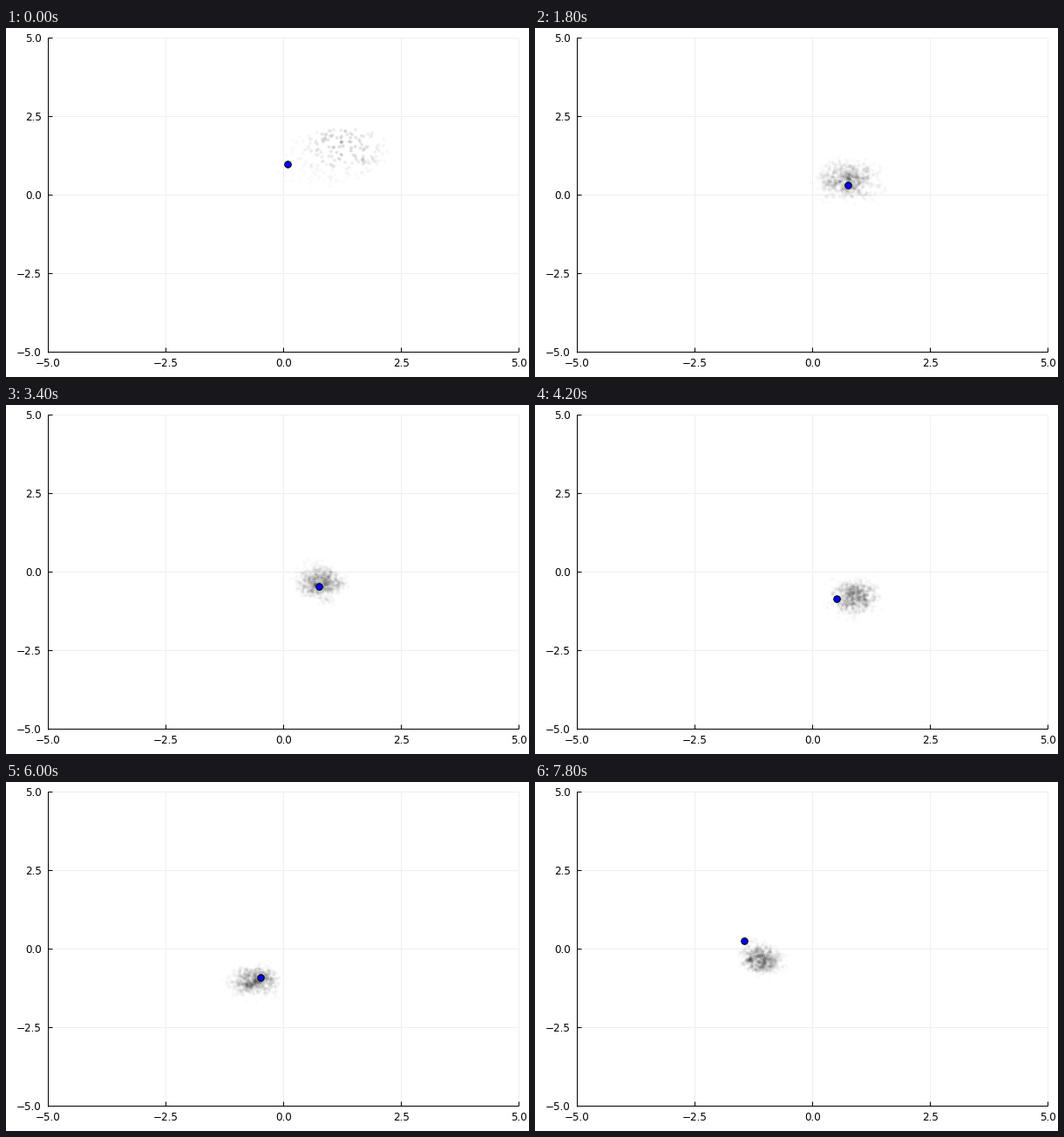
Animation of 600x400 px, one loop 8 s. Source, as a matplotlib script:

```python
import numpy as np
import matplotlib.pyplot as plt
from matplotlib.animation import FuncAnimation

W, H, DPI = 600, 400, 100
FRAMES, STEP = 40, 200
PT = 72 / DPI  # points per pixel
LEFT, RIGHT, TOP, BOTTOM = 48, 588, 11, 371
N, LOBES, PARENTS = 750, 6, 260

plt.rcParams["font.family"] = "DejaVu Sans"
fig = plt.figure(figsize=(W / DPI, H / DPI), dpi=DPI, facecolor="white")
ax = fig.add_axes([0, 0, 1, 1])
ax.set(xlim=(0, W), ylim=(H, 0))
ax.axis("off")


def line(x, y, color="black", z=1):
    ax.plot(x, y, color=color, lw=PT, zorder=z, solid_capstyle="butt")


def label(x, y, value, ha):
    text = f"{value:.1f}".replace("-", "\u2212")
    ax.text(x, y, text, ha=ha, va="center_baseline", fontsize=12 * PT)


for value in np.linspace(-5, 5, 5):
    x = LEFT + (value + 5) * 54
    y = BOTTOM - (value + 5) * 36
    if value > -5:
        line([x, x], [TOP, BOTTOM], "#efefef")
        line([LEFT, RIGHT], [y, y], "#efefef")
    line([x, x], [BOTTOM, BOTTOM - 5], z=2)
    line([LEFT, LEFT + 5], [y, y], z=2)
    label(x + 0.2, 383.3, value, "center")
    label(40.6, y + 0.5, value, "right")
line([LEFT, LEFT], [TOP, BOTTOM + 1], z=3)
line([LEFT, RIGHT], [BOTTOM, BOTTOM], z=3)

# Key points: seconds, point x and y, cloud centre x and y
KEYS = np.array([
    (0.0, 323.3, 156.2, 371, 150),
    (0.8, 341.3, 162.0, 338, 148),
    (1.8, 359.2, 180.2, 361, 176),
    (2.8, 363.3, 195.3, 354, 192),
    (4.2, 346.0, 222.2, 366, 221),
    (6.0, 291.8, 224.0, 283, 228),
    (7.8, 240.3, 182.0, 258, 202),
])
TIMES, PLACES = KEYS[:, 0], KEYS[:, 1:]
SLOPES = np.gradient(PLACES, TIMES, axis=0)


def places_at(t):
    """Smooth cubic path through the key points."""
    i = min(np.searchsorted(TIMES, t, side="right") - 1, len(TIMES) - 2)
    h = TIMES[i + 1] - TIMES[i]
    u = (t - TIMES[i]) / h
    p = ((1 + 2 * u) * (1 - u) ** 2 * PLACES[i]
         + u * (1 - u) ** 2 * h * SLOPES[i]
         + u * u * (3 - 2 * u) * PLACES[i + 1]
         + u * u * (u - 1) * h * SLOPES[i + 1])
    return p[:2], p[2:]


# Particles hang on parents, parents on a few slowly turning lobes
rng = np.random.default_rng(7)
lobe_angle = np.arange(LOBES) * 2 * np.pi / LOBES + rng.uniform(-0.4, 0.4, LOBES)
lobe_radius = rng.uniform(0.5, 1.25, LOBES)
lobe = rng.integers(0, LOBES, PARENTS)
parent = rng.integers(0, PARENTS, N)
drift_a, drift_b = rng.normal(0, 0.6, (2, PARENTS, 2)).clip(-1.4, 1.4)


def cloud_at(t, frame, centre):
    r = np.random.default_rng(100 + frame)
    angle = lobe_angle + 0.63 * t
    hub = lobe_radius[:, None] * np.column_stack([np.cos(angle), np.sin(angle)])
    drift = np.cos(0.9 * t) * drift_a + np.sin(0.9 * t) * drift_b
    offset = (hub[lobe] + drift)[parent] + r.normal(0, 0.18, (N, 2))
    spread = 13 + 11 * np.exp(-t / 4)
    alpha = 0.05 * np.exp(-0.28 * (offset ** 2).sum(axis=1))
    return centre + offset * spread * [1, 0.66], alpha


def first_cloud(centre, count=240):
    """Even scatter before any resampling, darkest at the upper right."""
    r = np.random.default_rng(21)
    angle, radius = r.uniform(0, 2 * np.pi, count), np.sqrt(r.uniform(0, 1, count))
    x = 62 * radius * np.cos(angle) + r.normal(0, 5, count)
    y = 35 * radius * np.sin(angle)
    x -= 0.45 * np.abs(y) * np.sign(y)
    alpha = 0.008 + 0.12 * np.exp(-((x - 18) / 38) ** 2 - ((y + 15) / 24) ** 2)
    return centre + np.column_stack([x, y]), alpha


cloud = ax.scatter([], [], s=(3.9 * PT) ** 2, linewidths=0, zorder=4)
dot, = ax.plot([], [], "o", ms=7.6 * PT, mfc="#0000ff", mec="black",
               mew=PT, zorder=5)


def draw(frame):
    t = frame * STEP / 1000
    point, centre = places_at(t)
    spots, alpha = cloud_at(t, frame, centre) if frame else first_cloud(centre)
    colors = np.zeros((len(spots), 4))
    colors[:, 3] = alpha
    cloud.set_offsets(spots)
    cloud.set_facecolors(colors)
    dot.set_data(point[:1], point[1:])
    return cloud, dot


anim = FuncAnimation(fig, draw, frames=FRAMES, interval=STEP, repeat=True,
                     repeat_delay=0, blit=False)
plt.show()
```
